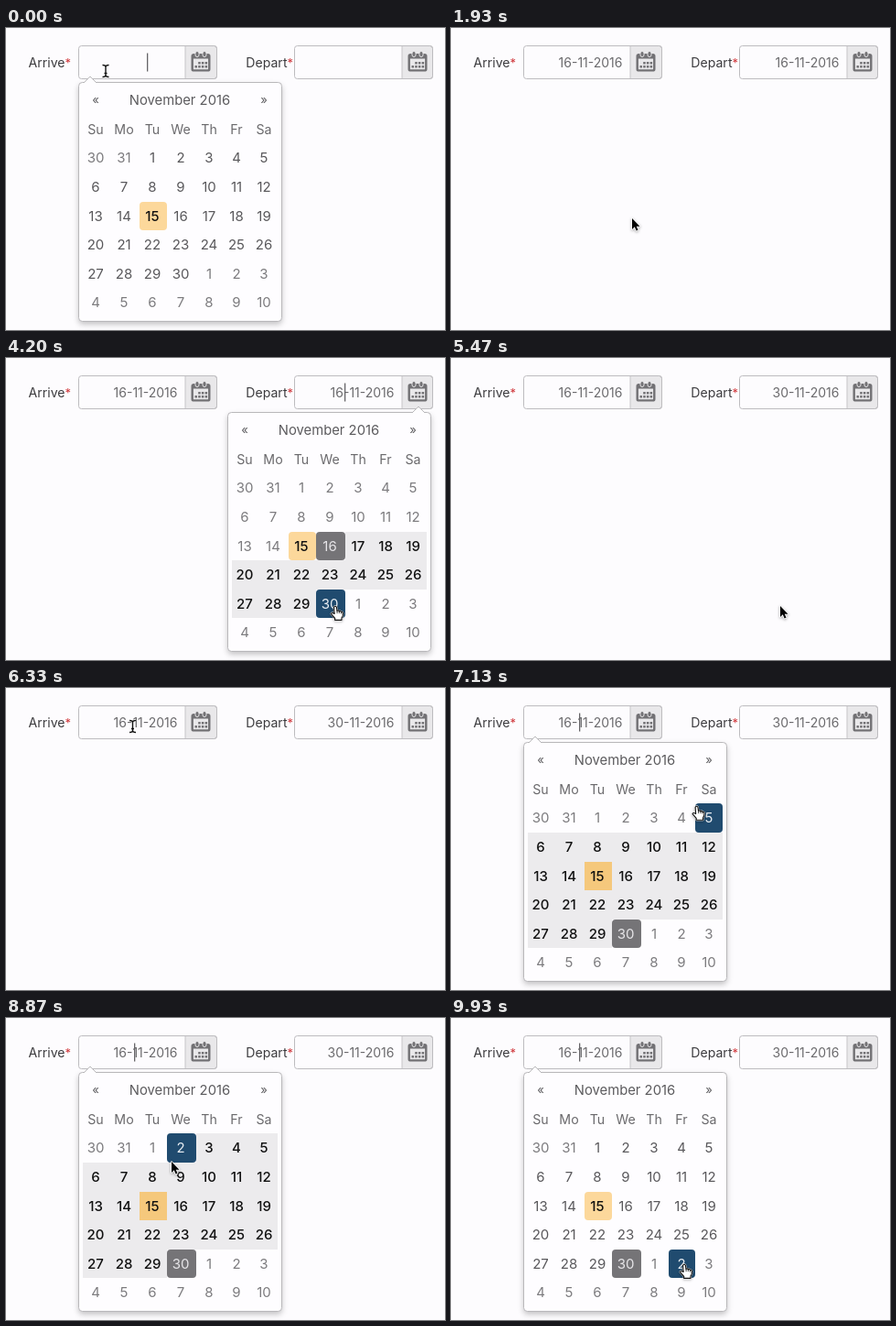
An HTML page with a canvas for the animation above (9.99 s loop, 480x330 px).

```html
<!DOCTYPE html>
<html>
<head>
<meta charset="utf-8">
<style>
html, body { margin: 0; width: 100%; height: 100%; overflow: hidden; background: #fdfcfe; }
canvas { display: block; }
</style>
</head>
<body>
<canvas id="stage" width="480" height="330"></canvas>
<script>
const c = document.getElementById('stage').getContext('2d');
const LOOP = 9990, PAGE = '#fdfcfe', NAVY = '#204b6f', GRAY = '#757477';
const CENTERS = [98, 129, 160, 191, 222, 252, 282];
const EDGES = [84, 114, 146, 176, 208, 238, 267, 297];
const ROW = 31.6, TOP = 126.4;

// Pointer stops: time, x, y
const STOPS = [
  [620, 109, 47], [1200, 198, 216], [1330, 198, 208],
  [1960, 198, 208], [2800, 371, 41],
  [3420, 371, 41], [4200, 360, 271],
  [5680, 360, 271], [6150, 130, 23], [6330, 138.5, 42],
  [6880, 138.5, 42], [7230, 300, 150], [7500, 284, 212], [7790, 219, 210],
  [7870, 219, 210], [8300, 155, 178], [8730, 185, 146],
  [8800, 185, 146], [8870, 181, 157],
  [8930, 181, 157], [9800, 257, 264], [9930, 255, 269]
];

// Open calendars: dx shifts the panel, start or end is the other date of the stay
const PANELS = [
  { from: 0, to: 1930, dx: 0, notch: 92, caret: 154, blink: -30 },
  { from: 3070, to: 5400, dx: 163, notch: 451, caret: 370, blink: 3100, start: 16 },
  { from: 6670, to: LOOP, dx: 0, notch: 92, caret: 140, blink: 6670, end: 30, own: 16 }
];

function pointerAt(t) {
  const i = STOPS.findIndex(s => s[0] > t);
  if (i === 0) return STOPS[0].slice(1);
  if (i < 0) return STOPS[STOPS.length - 1].slice(1);
  const [t0, x0, y0] = STOPS[i - 1], [t1, x1, y1] = STOPS[i];
  const p = (t - t0) / (t1 - t0), e = p * p * (3 - 2 * p);
  return [x0 + (x1 - x0) * e, y0 + (y1 - y0) * e];
}

function text(s, x, y, { size = 14.5, color = '#5c5b5e', align = 'center', weight = 400 } = {}) {
  c.font = `${weight} ${size}px Inter, "Open Sans", sans-serif`;
  c.textAlign = align;
  c.fillStyle = color;
  c.fillText(s, x, y);
}

function box(x, y, w, h, r, fill, stroke) {
  c.beginPath();
  c.roundRect(x, y, w, h, r);
  if (fill) { c.fillStyle = fill; c.fill(); }
  if (stroke) { c.strokeStyle = stroke; c.stroke(); }
}

function icon(x) {
  const ink = '#727174';
  c.lineWidth = 2.4;
  box(x + 1.2, 29.2, 18.6, 17.2, 1.5, null, ink);
  c.lineWidth = 1;
  box(x + 1, 29, 19, 4.5, 1, ink);
  for (const px of [5, 13]) box(x + px - 0.5, 25.5, 4, 6, 2, ink, '#e9e8ea');
  for (let i = 1; i < 8; i++)
    box(x + 4 + i % 4 * 3.7, 37 + (i >> 2) * 4, 2.5, 2.5, 0.5, ink);
}

function field(label, labelEnd, x, split, date) {
  text(label, labelEnd, 43, { size: 14.1, color: '#3c3b3e', align: 'right' });
  text('*', labelEnd, 43, { size: 13, color: '#d0383c', align: 'left' });
  c.lineWidth = 1;
  box(x, 19.5, 151, 36, 3, PAGE);
  box(split, 19.5, x + 151 - split, 36, [0, 3, 3, 0], '#e9e8ea', '#c6c5c8');
  box(x, 19.5, 151, 36, 3, null, '#bdbcbf');
  icon(split + 6.5);
  text(date, split - 8.5, 43, { size: 14, color: '#6b6a6d', align: 'right' });
}

function cellAt(x, y) {
  const col = EDGES.findIndex((e, i) => x >= e && x < EDGES[i + 1]);
  const row = Math.floor((y - TOP) / ROW);
  return col < 0 || row < 0 || row > 5 ? null : row * 7 + col - 1;
}

function drawPanel(p, hover) {
  c.save();
  c.shadowColor = 'rgba(0,0,0,.25)';
  c.shadowBlur = 6;
  c.shadowOffsetY = 3;
  box(79.5 + p.dx, 59.5, 222, 261, 4, '#fefdff');
  c.restore();
  box(79.5 + p.dx, 59.5, 222, 261, 4, null, '#b9b8bb');
  c.beginPath();
  c.moveTo(p.notch - 7, 60);
  c.lineTo(p.notch, 53);
  c.lineTo(p.notch + 7, 60);
  c.fillStyle = '#fefdff';
  c.fill();
  c.stroke();
  c.fillRect(p.notch - 6, 60, 12, 1);

  c.save();
  c.translate(p.dx, 0);
  text('«', 98, 83, { size: 13 });
  text('November 2016', 190, 84, { size: 14.8 });
  text('»', 282, 83, { size: 13 });
  ['Su', 'Mo', 'Tu', 'We', 'Th', 'Fr', 'Sa'].forEach((d, i) =>
    text(d, CENTERS[i], 116, { size: 14.2, color: '#6a696c' }));

  const active = hover ?? p.own;
  const start = p.start ?? active, end = p.end ?? active;
  const ranged = start < end && (p.start || p.end);
  for (let i = 0; i < 42; i++) {
    const n = i - 1, col = i % 7, row = i / 7 | 0;
    const x = EDGES[col], y = Math.round(TOP + row * ROW), w = EDGES[col + 1] - x;
    const h = Math.round(TOP + (row + 1) * ROW) - y;
    const inside = ranged && n > start && n < end;
    const today = n === 15;
    const dim = n < 1 || n > 30 || ranged && n < start;
    let color = dim ? '#7c7b7e' : '#59585b', weight = 400;
    if (inside) {
      c.fillStyle = today ? '#f5c87c' : '#ecebed';
      c.fillRect(x, y, w, h);
    }
    if (inside || today) { color = '#111'; weight = 500; }
    if (n === active) {
      box(x, y, w, h, 4, NAVY);
      color = '#e9eef3';
      weight = 400;
    } else if (n === p.start || n === p.end) {
      box(x, y, w, h, 4, GRAY);
      color = '#e6e5e8';
    } else if (today && !inside) box(x, y, w, h, 4, '#fcd89b');
    const day = n < 1 ? n + 31 : n > 30 ? n - 30 : n;
    text(day, CENTERS[col], TOP + row * ROW + 21, { size: 15, color, weight });
  }
  c.restore();
}

const ARROW = new Path2D('M0 0V14.5L3.4 11.4L5.6 16.6L8 15.6L5.8 10.6H10.4Z');
const HAND = new Path2D('M-1.6 1.4Q0 -.8 1.6 1.4L2.2 6Q3.8 4.8 4.8 6.4Q6.4 5.4 7.2 7.2' +
  'Q9.4 6.6 9.4 9Q9.6 12 7.8 14.2V17H-.4V15Q-2.6 12.4 -5 9.6Q-4.6 7.2 -1 9.4Z');
const FINGERS = new Path2D('M2.3 6V9M4.8 6.5V9M7.2 7.2V9.5');
const BEAM = new Path2D('M-3.5 -6.5Q0 -6.5 0 -4.5Q0 -6.5 3.5 -6.5M0 -5V5M-3.5 6.5Q0 6.5 0 4.5Q0 6.5 3.5 6.5M-1.5 2.5H1.5');

function outline(path, color, width) {
  c.strokeStyle = color;
  c.lineWidth = width;
  c.stroke(path);
}

function drawPointer(x, y, hand) {
  const typing = y > 19 && y < 56 && (x > 79 && x < 196 || x > 315 && x < 433);
  c.save();
  c.translate(x, y);
  c.lineJoin = 'round';
  if (typing) {
    outline(BEAM, 'rgba(255,255,255,.8)', 3);
    outline(BEAM, '#111', 1.4);
  } else {
    const path = hand ? HAND : ARROW, size = hand ? 0.9 : 0.82;
    c.scale(size, size);
    c.save();
    c.shadowColor = 'rgba(0,0,0,.35)';
    c.shadowBlur = 3;
    c.shadowOffsetY = 1;
    outline(path, '#fff', 2);
    c.restore();
    c.fillStyle = hand ? '#fff' : '#000';
    c.fill(path);
    if (hand) {
      outline(path, '#111', 1.3);
      outline(FINGERS, '#111', 0.9);
    }
  }
  c.restore();
}

function draw(t) {
  c.fillStyle = PAGE;
  c.fillRect(0, 0, 480, 330);
  const panel = PANELS.find(p => t >= p.from && t < p.to);
  const [x, y] = pointerAt(t);
  field('Arrive', 64.5, 79.5, 196, t < 1930 ? '' : '16-11-2016');
  field('Depart', 307.5, 315.5, 433, t < 1930 ? '' : t < 5400 ? '16-11-2016' : '30-11-2016');
  let hand = false;
  if (panel) {
    const hover = cellAt(x - panel.dx, y);
    const edge = Math.abs((y - TOP) % ROW - ROW / 2);
    hand = hover !== null && edge < 14.6;
    c.lineWidth = 1;
    drawPanel(panel, hover);
    if (Math.floor((t - panel.blink) / 500) % 2 === 0) {
      c.fillStyle = '#656467';
      c.fillRect(panel.caret, 27.5, 1.3, 20);
    }
  }
  drawPointer(x, y, hand);
}

const begin = performance.now();
function tick() {
  draw((performance.now() - begin) % LOOP);
  requestAnimationFrame(tick);
}
tick();
</script>
</body>
</html>
```
